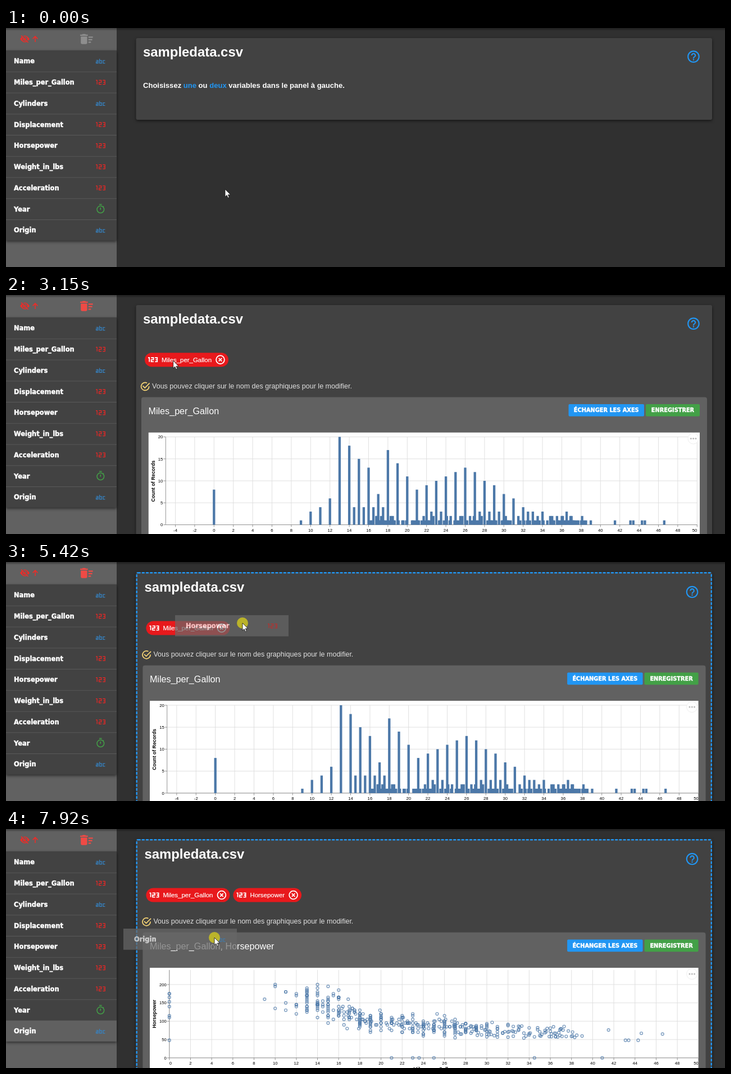
Write an HTML page that moves like this. It is 1280 px wide and 427 px high and loops after 8000 ms.

```html
<!DOCTYPE html>
<html lang="fr">
<head>
<meta charset="utf-8">
<title>sampledata.csv</title>
<style>
html, body { margin: 0; width: 100%; height: 100%; overflow: hidden; background: #303030; }
#stage { display: block; width: 100%; height: 100%; font-family: "Liberation Sans", Arial, sans-serif; }
.heavy { font-family: "DejaVu Sans", sans-serif; font-weight: bold; fill: #fff; stroke: #fff; stroke-width: .45px; }
.bold { font-weight: bold; fill: #fff; }
.line { fill: none; stroke-width: 1.25; }
.lift { filter: drop-shadow(0 2px 2.5px rgba(0, 0, 0, .55)); }
.tick { font-size: 7.7px; fill: #000; }
</style>
</head>
<body>
<svg id="stage" viewBox="0 0 1280 427" preserveAspectRatio="none"></svg>
<script>
const LOOP = 8000;
const BLUE = '#2196f3', RED = '#e8191c', STEEL = '#4c78a8';
const $ = id => document.getElementById(id);
const set = (id, attrs) => { for (const k in attrs) $(id).setAttribute(k, attrs[k]); };
const show = (id, on) => set(id, { display: on ? 'inline' : 'none' });
const put = (id, x, y) => set(id, { transform: `translate(${x} ${y})` });
const rect = (x, y, w, h, fill, more = '') =>
  `<rect x="${x}" y="${y}" width="${w}" height="${h}" fill="${fill}" ${more}/>`;
const text = (x, y, s, size, more = '') => `<text x="${x}" y="${y}" font-size="${size}" ${more}>${s}</text>`;
const path = (d, more = '') => `<path d="${d}" ${more}/>`;
const mix = (a, b, u) => a + (b - a) * u;
const range = (from, to, step = 1) =>
  Array.from({ length: Math.round((to - from) / step) + 1 }, (_, i) => from + i * step);

/* Sidebar rows */

const PITCH = 37.75, TOP = 40;
const ROWS = [['Name', 'abc'], ['Miles_per_Gallon', 'num'], ['Cylinders', 'abc'], ['Displacement', 'num'],
  ['Horsepower', 'num'], ['Weight_in_lbs', 'num'], ['Acceleration', 'num'], ['Year', 'time'], ['Origin', 'abc']];
const rowTop = i => TOP + i * PITCH;

const NUM = 'M0 1.2H2.2V8.6M5.3 1.2H9.6V4.8H5.6V8.4H10M12.2 1.2H16.2V8.4H12.2M13.2 4.8H16.2';
const ICONS = {
  num: path(NUM, 'class="line" stroke="#ee2624"'),
  abc: path('M.5 3.4H4V8.3H.6V5.8H4M6.6 .6V8.3H10.2V3.7H6.6M16.4 3.7H12.9V8.3H16.4', 'class="line" stroke="#3583c4"'),
  time: `<g class="line" stroke="#43a047" style="stroke-width:1.5"><circle cx="8.3" cy="5.4" r="6.3"/>
    ${path('M6-3.4H10.6M8.3 2V6M12.8 1L14 -.2')}</g>`
};
const row = ([name, type], iconX = 160) => text(14, 23.3, name, 11.45, 'class="heavy"') +
  `<g transform="translate(${iconX} 14.5)">${ICONS[type]}</g>`;

function sidebar() {
  const list = ROWS.map((r, i) => `<g transform="translate(0 ${rowTop(i)})">
    ${rect(0, 0, 197, PITCH, '#424242')}${rect(0, 0, 197, PITCH, '#fff', `id="glow${i}" opacity="0"`)}
    ${i ? rect(0, 0, 197, 1, '#5a5a5a') : ''}${row(r)}</g>`).join('');
  return rect(0, 0, 197, 427, '#616161') +
    path('M25 19.5Q33.5 7.5 42 19.5Q33.5 31.5 25 19.5Z', 'fill="#ee2c28"') +
    '<circle cx="33.5" cy="19.5" r="3.8" fill="none" stroke="#616161" stroke-width="1.5"/>' +
    path('M28 12.6L40.5 25', 'stroke="#616161" stroke-width="1.5"') +
    path('M27 13.4L39.6 26', 'stroke="#ee2c28" stroke-width="1.6"') +
    path('M52 25V15M47.6 19.4L52 15L56.4 19.4', 'fill="none" stroke="#ee2c28" stroke-width="1.6"') +
    path('M15 16h4v2h-4zm0-8h7v2h-7zm0 4h6v2h-6zM3 18c0 1.1.9 2 2 2h6c1.1 0 2-.9 2-2V8H3v10zM14 5h-3l-1-1H6L5 5H2v2h12V5z',
      'id="trash" transform="translate(129.8 6.2) scale(1.13)"') +
    `<g class="lift">${list}</g>`;
}

/* Chart data */

let seed = 29;
const rnd = () => (seed = seed * 16807 % 2147483647) / 2147483647;

// Reads a value off a polyline of [x, y] points.
function lerpAt(points, v) {
  const i = Math.max(1, points.findIndex(p => p[0] >= v));
  const [a, b] = [points[i - 1], points[i]];
  return mix(a[1], b[1], (v - a[0]) / (b[0] - a[0]));
}

// Whole mileages are common, halves less so, other tenths are rare.
const PEAKS = [[9, 1], [12, 6], [13, 20], [16, 13], [17, 7], [18, 17], [21, 8], [26, 13], [28, 10], [33, 3], [39, 1]];
const TREND = [[9, 193], [13, 158], [16, 142], [18, 104], [24, 90], [30, 74], [39, 65]];
const TAIL = [[41.5, 76], [43.1, 48], [43.4, 48], [44.3, 48], [44.6, 67], [46.6, 65]];
const NO_POWER = [21, 23, 23.6, 25, 34.5, 40.9];
const NO_MILEAGE = [48, 110, 115, 140, 153, 165, 175, 175];

function countOf(tenths) {
  const v = tenths / 10;
  if (tenths % 10 === 0) return Math.round(lerpAt(PEAKS, v));
  if (tenths % 5 === 0) return v < 14 ? 0 : v < 18 ? 4 : Math.ceil(rnd() * 3);
  return v > 16 && rnd() < .4 ? 1 + (rnd() < .2) : 0;
}
function powerFor(v) {
  const spread = v < 17 ? 44 : v < 28 ? 25 : 17;
  const hp = lerpAt(TREND, v) + (rnd() + rnd() + rnd() - 1.5) * spread;
  return v < 28 ? Math.round(hp / 5) * 5 : hp;
}
const BODY = range(90, 390).map(n => [n / 10, countOf(n)]).filter(c => c[1]);
const COUNTS = [[0, NO_MILEAGE.length], ...BODY, ...TAIL.map(([v]) => [v, 1])];
const CARS = [...BODY.flatMap(([v, n]) => range(1, n).map(() => [v, powerFor(v)])),
  ...TAIL, ...NO_POWER.map(v => [v, 0]), ...NO_MILEAGE.map(hp => [0, hp])];

/* Charts */

function axes(x, y, xs, ys, left, top, title, titleY) {
  const base = y(0);
  const line = (d, color) => path(d, `stroke="${color}" stroke-width=".9" fill="none"`);
  return line(xs.map(v => `M${x(v)} ${top}V${base}`).join('') +
      ys.map(v => `M${left} ${y(v)}H1230.5`).join(''), '#ddd') +
    line(`M${left} ${top}V${base}H1230.5` + xs.map(v => `M${x(v)} ${base}v4`).join('') +
      ys.map(v => `M${left} ${y(v)}h-4`).join(''), '#888') +
    xs.map(v => {
      const edge = x(v) < left + 1 ? 'start' : v === 50 ? 'end' : 'middle';
      return text(x(v), base + 12.4, v, 7.7, `class="tick" text-anchor="${edge}"`);
    }).join('') +
    ys.map(v => text(left - 5, y(v) + 2.8, v, 7.7, 'class="tick" text-anchor="end"')).join('') +
    text(0, 0, title, 8.8, `font-weight="bold" text-anchor="middle" transform="translate(265 ${titleY}) rotate(-90)"`);
}

function histogram() {
  const x = v => 370.3 + v * 17.2, y = n => 410.5 - n * 7.85;
  return axes(x, y, range(-4, 50, 2), range(0, 20, 5), 284.3, 253.5, 'Count of Records', 332.5) +
    COUNTS.map(([v, n]) => rect(x(v) - 2.15, y(n), 4.3, n * 7.85, STEEL)).join('');
}

function scatter() {
  const x = v => 288.4 + v * 18.84, y = hp => 406.5 - hp * .655;
  return axes(x, y, range(0, 50, 2), range(0, 200, 50), 288.4, 249.5, 'Horsepower', 328) +
    text(759, 430, 'Miles_per_Gallon', 8.8, 'font-weight="bold" text-anchor="middle"') +
    `<g fill="none" stroke="${STEEL}" stroke-width="1.4" stroke-opacity=".7">` +
    CARS.map(([v, hp]) => `<circle cx="${x(v)}" cy="${y(hp)}" r="2.4"/>`).join('') + '</g>';
}

/* Main panel */

const chip = (x, w, name) => rect(x, 103.2, w, 25, RED, 'rx="12.5"') +
  `<g transform="translate(${x + 6} 110.8)">${path(NUM, 'class="line" stroke="#fff" style="stroke-width:1.8"')}</g>` +
  text(x + 30, 119.6, name, 11.45, 'fill="#fff" stroke="#fff" stroke-width=".2"') +
  `<g fill="none" stroke="#fff" stroke-width="1.8"><circle cx="${x + w - 14.5}" cy="115.6" r="7.4"/>
    ${path(`M${x + w - 17.3} 112.8l5.6 5.6m0-5.6l-5.6 5.6`)}</g>`;
const button = (x, w, fill, label) => rect(x, 195, w, 21.8, fill, 'rx="2"') +
  text(x + w / 2, 209.3, label, 9.8, 'class="heavy" text-anchor="middle"');

function panel() {
  return `<g class="lift">${rect(231.5, 18, 1025.5, 146, '#424242', 'id="box" rx="3"')}
    <g id="drop">${rect(231.5, 169, 1025.5, 38, '#303030')}${rect(231.5, 169, 1025.5, 1, '#e0e0e0')}
      <g transform="translate(236.5 169)">${row(ROWS[1], 984)}</g></g></g>
    ${rect(232.7, 19.2, 1023.1, 148.6, 'none', `id="dash" rx="2" stroke="${BLUE}" stroke-width="2.4" stroke-dasharray="4.8 2.4"`)}
    <g id="charts">${rect(241, 182.4, 1007, 300, '#616161', 'id="card" rx="4"')}
      <svg id="plot" x="253.5" y="245.4" width="981.5" height="200">${rect(0, 0, 982, 200, '#fff')}
        <g transform="translate(-253.5 -245.4)"><g id="hist">${histogram()}</g><g id="scat">${scatter()}</g></g></svg></g>
    <g id="left">
      ${text(244, 51, 'sampledata.csv', 23.9, 'class="bold"')}
      <g id="hint">${text(244, 107, `Choisissez <tspan fill="${BLUE}">une</tspan> ou <tspan fill="${BLUE}">deux</tspan>` +
        ' variables dans le panel à gauche.', 13.05, 'class="bold"')}</g>
      <g id="result">${chip(247, 149, 'Miles_per_Gallon')}<g id="chip2">${chip(402, 121.7, 'Horsepower')}</g>
        <g fill="none" stroke="#fbd876" stroke-width="1.7">${path('M251 157.3A7 7 0 1 0 254.6 163M243.6 162.4L247.2 166L255.6 157.4')}</g>
        ${text(260, 167, 'Vous pouvez cliquer sur le nom des graphiques pour le modifier.', 12.54, 'fill="#e0e0e0"')}
        <text id="name" x="253.5" y="213" font-size="16.15" fill="#fff"></text></g></g>
    <g id="right">
      ${path('M11 18h2v-2h-2v2zm1-16C6.48 2 2 6.48 2 12s4.48 10 10 10 10-4.48 10-10S17.52 2 12 2zm0 18c-4.41 0-8-3.59-8-8s3.59-8 8-8 8 3.59 8 8-3.59 8-8 8zm0-14c-2.21 0-4 1.79-4 4h2c0-1.1.9-2 2-2s2 .9 2 2c0 2-3 1.75-3 5h2c0-2.25 3-2.5 3-5 0-2.21-1.79-4-4-4z',
        `fill="${BLUE}" transform="translate(1211 38.2) scale(1.08)"`)}
      <g id="tools">${button(1001.5, 134.5, BLUE, 'ÉCHANGER LES AXES')}${button(1139, 96, '#43a047', 'ENREGISTRER')}
        <circle cx="1223.6" cy="256.5" r="9.6" fill="#fff" stroke="#eee"/>
        ${range(-1, 1).map(i => `<circle cx="${1223.7 + i * 4.3}" cy="256.5" r="1.5" fill="#bbb"/>`).join('')}</g></g>`;
}

$('stage').innerHTML = `<defs><linearGradient id="shade" x2="0" y2="1">
    <stop stop-opacity=".4"/><stop offset="1" stop-opacity="0"/></linearGradient></defs>
  ${rect(0, 0, 1280, 427, '#303030')}${panel()}${sidebar()}${rect(0, 0, 1280, 5, 'url(#shade)')}
  <g id="ghost" opacity=".7">${rect(0, 0, 202, PITCH, '#686868')}
    ${ROWS.map((r, i) => `<g id="ghost${i}" transform="translate(5 0)" display="none">${row(r)}</g>`).join('')}</g>
  <g id="pointer"><circle id="press" r="10" fill="#c8c022" opacity=".87"/>
    ${path('M3.5 9.5h7v9h-7z', 'id="parcel" fill="none" stroke="#ddd" stroke-dasharray="1.5 1.2"')}
    ${path('M0 0V13.5L3.1 10.7L5.2 15.5L7.3 14.6L5.3 9.9H9.7Z', 'id="arrow" fill="#fff" stroke="#111" stroke-width=".8"')}
    ${path('M-1.3 .3Q.2-1.2 1.8 .3V6Q8.3 6.2 8.3 9.5V13L6.6 17.3H-1.2L-5.6 11Q-5.6 8.4-3.3 9.4L-1.3 11Z',
      'id="hand" fill="#fff" stroke="#111" stroke-width=".9"')}</g>`;

/* Motion */

const smooth = u => u * u * (3 - 2 * u);
const easeIn = u => u ** 1.5;
const easeOut = u => 1 - (1 - u) ** 1.4;

// Pointer moves; it rests in between.
const HOME = [390, 288];
const MOVES = [
  { from: 240, to: 1080, at: [94, 73] },
  { from: 1180, to: 1230, at: [78, 94] },
  { from: 1590, to: 2310, at: [363, 88] },
  { from: 2900, to: 3630, at: [124, 195] },
  { from: 3630, to: 4020, at: [115, 205] },
  { from: 4400, to: 4980, at: [243, 161], ease: easeIn },
  { from: 4980, to: 5420, at: [421, 109], ease: easeOut },
  { from: 6210, to: 6290, at: [400, 121] },
  { from: 6290, to: 7070, at: [157, 358] },
  { from: 7430, to: 7920, at: [371, 194] }
];
// Each drag picks up a row; "rest" is the glow the row keeps meanwhile.
const GLOW = .16;
const DRAGS = [
  { row: 1, press: 1480, from: 1620, drop: 2690, end: 2930, grab: [78, 94], rest: .07 },
  { row: 4, press: 4260, from: 4430, drop: 5900, end: 6050, grab: [115, 205], rest: 0 },
  { row: 8, press: 7310, from: 7460, drop: LOOP, end: LOOP, grab: [157, 358], rest: GLOW }
];

function pointerAt(t) {
  let [x, y] = HOME;
  for (const { from, to, at, ease = smooth } of MOVES) {
    if (t < from) break;
    const e = ease(Math.min(1, (t - from) / (to - from)));
    x = mix(x, at[0], e);
    y = mix(y, at[1], e);
  }
  return [x, y];
}

function glowOf(d, t) {
  if (t < d.press || t >= d.end) return 0;
  return mix(GLOW, d.rest, Math.min(1, Math.max(0, t - d.from) / 500));
}

function render(t) {
  const [x, y] = pointerAt(t);
  const active = DRAGS.find(d => t >= d.from && t < d.end);
  const held = active && t < active.drop;
  const charted = t >= DRAGS[0].end, paired = t >= DRAGS[1].end;
  const inset = active ? 2.4 : 0, boxH = charted ? 480 : active ? 151 : 146;

  set('box', { height: boxH });
  set('dash', { height: boxH - 2.4 });
  show('dash', active);
  show('drop', active && !charted && x > 231);
  put('left', inset, inset);
  put('right', -inset, inset);
  set('card', { x: 241 + inset, y: 182.4 + inset, width: 1007 - 2 * inset });
  set('plot', { x: 253.5 + inset, y: 245.4 + inset, width: 981.5 - 2 * inset });
  show('hint', !charted);
  for (const id of ['charts', 'result', 'tools']) show(id, charted);
  show('hist', !paired);
  show('scat', paired);
  show('chip2', paired);
  $('name').textContent = paired ? 'Miles_per_Gallon, Horsepower' : 'Miles_per_Gallon';
  set('trash', { fill: charted ? '#ef4a45' : '#8e8e8e' });

  show('ghost', held);
  if (held) put('ghost', x - active.grab[0] - 5, y - active.grab[1] + rowTop(active.row));
  for (const d of DRAGS) {
    set('glow' + d.row, { opacity: glowOf(d, t) });
    show('ghost' + d.row, d === active);
  }
  const hand = !held && x < 197 && y > TOP && y < rowTop(ROWS.length);
  put('pointer', x, y);
  show('press', DRAGS.some(d => t >= d.press && t < d.drop));
  show('parcel', held && x < 260);
  show('hand', hand);
  show('arrow', !hand);
}

const start = performance.now();
function tick() {
  render((performance.now() - start) % LOOP);
  requestAnimationFrame(tick);
}
tick();
</script>
</body>
</html>
```
